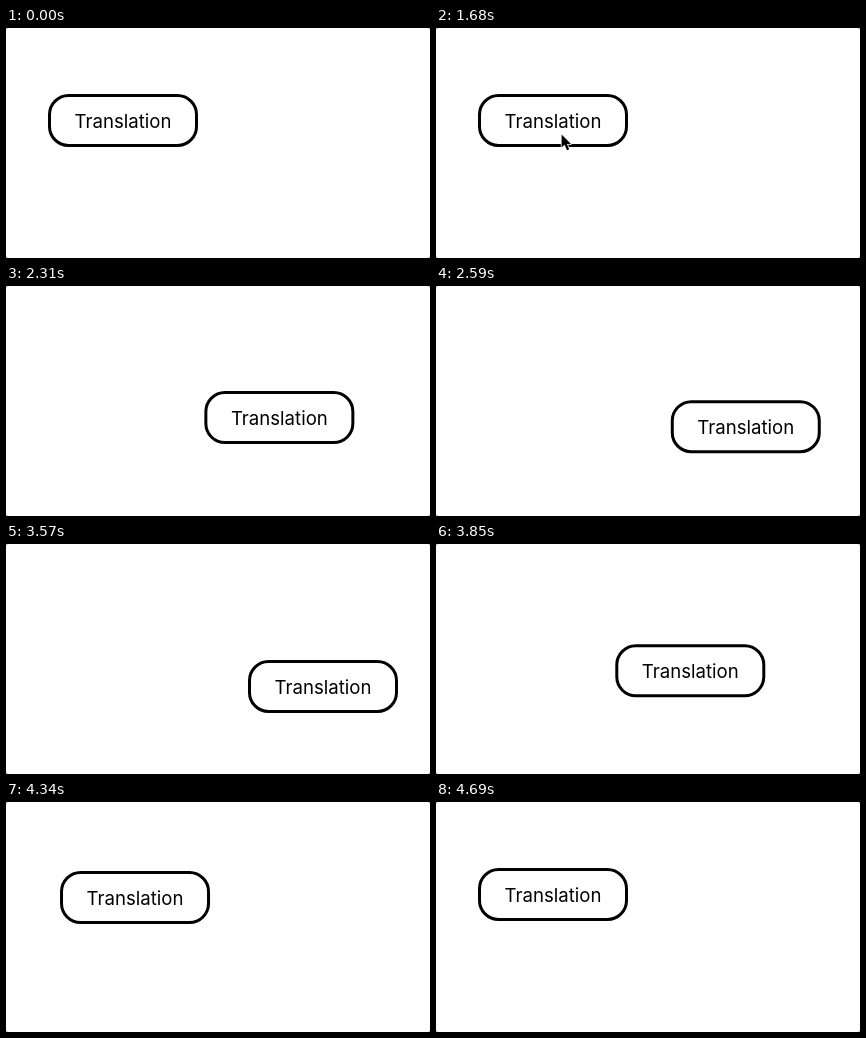
An HTML page that plays this animation: 424x230 px, repeating every 5.32 s.

```html
<!DOCTYPE html>
<html lang="en">
<head>
<meta charset="utf-8">
<title>Translation</title>
<style>
  html, body { margin: 0; width: 100%; height: 100%; overflow: hidden; background: #777; }
  svg { display: block; width: 100vw; height: 100vh; }
  text { font: 400 18.6px Inter, "Liberation Sans", sans-serif; text-anchor: middle; }
</style>
</head>
<body>
<svg viewBox="0 0 424 230">
  <rect width="424" height="230" rx="2" fill="#fff"/>
  <g id="button">
    <rect x="43.5" y="67.5" width="147" height="50" rx="19" fill="#fff" stroke="#000" stroke-width="3"/>
    <text x="117" y="99.5">Translation</text>
  </g>
  <path id="cursor" d="M125.6 106.4V119.6L128.6 116.8L131 122.3L133.2 121.3L130.9 116H135Z"
    fill="#000" stroke="#fff" stroke-width="1.6" stroke-linejoin="round" paint-order="stroke"/>
</svg>
<script>
  const LOOP = 5320, STEP = 70, DURATION = 1000;
  const OUT = 1830, BACK = 3642;
  const DX = 200, DY = 50;
  const button = document.getElementById('button');
  const cursor = document.getElementById('cursor');

  const bezier = (a, b, s) => 3 * a * s * (1 - s) ** 2 + 3 * b * s * s * (1 - s) + s ** 3;

  // cubic-bezier(.25, .1, .25, 1), solved for x by bisection
  function ease(x) {
    if (x <= 0) return 0;
    if (x >= 1) return 1;
    let lo = 0, hi = 1;
    for (let i = 0; i < 30; i++) {
      const mid = (lo + hi) / 2;
      if (bezier(0.25, 0.25, mid) < x) lo = mid; else hi = mid;
    }
    return bezier(0.1, 1, lo);
  }

  function draw(time) {
    const t = Math.floor((time % LOOP) / STEP) * STEP;
    const k = ease((t - OUT) / DURATION) - ease((t - BACK) / DURATION);
    button.setAttribute('transform', `translate(${DX * k} ${DY * k})`);
    cursor.style.display = t >= 1680 && t < 1820 ? '' : 'none';
  }

  let start;
  function tick(now) {
    start ??= now;
    draw(now - start);
    requestAnimationFrame(tick);
  }
  draw(0);
  requestAnimationFrame(tick);
</script>
</body>
</html>
```
